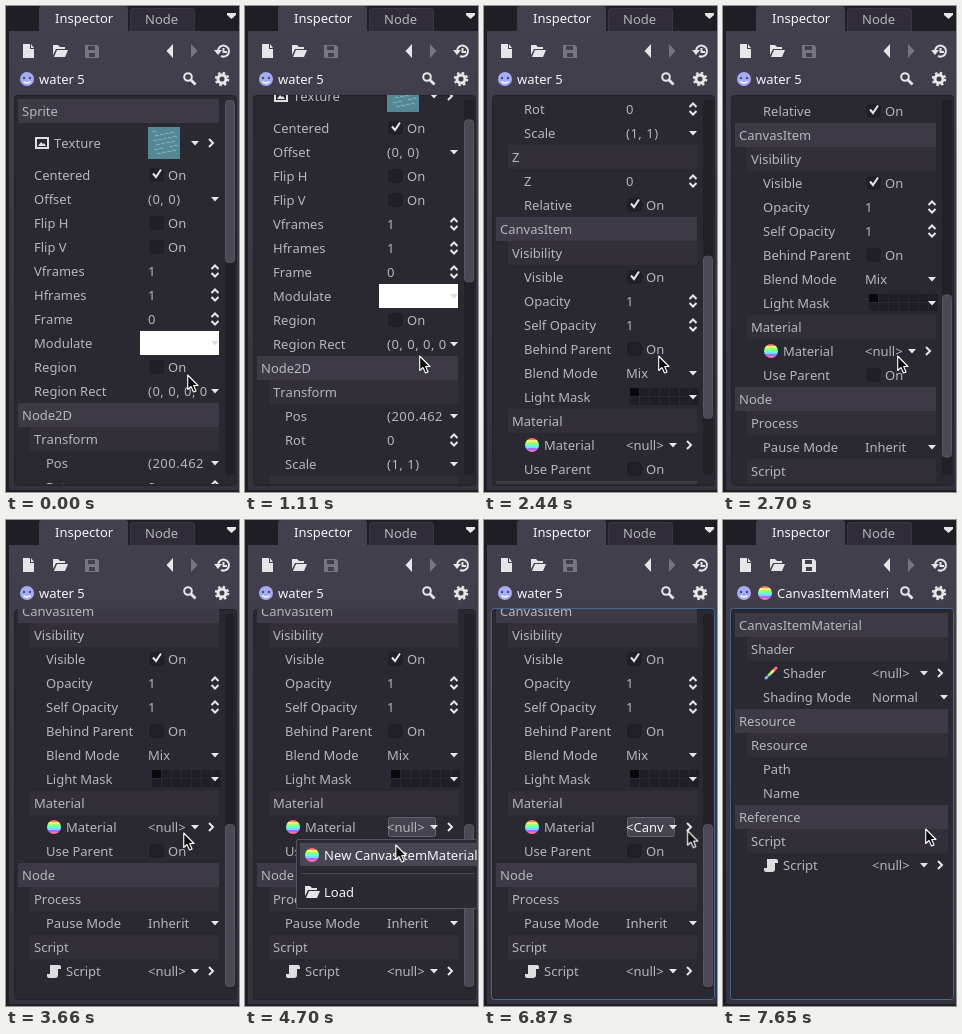
Recreate the animation shown at these times as an HTML page. Size 233 px wide and 486 px high, loop 8000 ms.

```html
<!DOCTYPE html>
<html lang="en">
<head>
<meta charset="utf-8">
<title>Inspector</title>
<style>
html, body { margin: 0; width: 100%; height: 100%; overflow: hidden; background: #201e25; }
svg { display: block; width: 233px; height: 486px; font: 13px "Noto Sans", sans-serif; font-kerning: none; fill: #b7b6ba; }
text { white-space: pre; }
.lit { fill: #e6e5e8; }
.lit text, text.lit { fill: #f6f5f8; }
.pale { fill: #dddce0; }
.num { letter-spacing: .5px; }
.line { fill: none; stroke: #e6e5e8; stroke-width: 2; }

#stage { animation: wheel 8s step-end infinite; }
#rows { transform: translateY(calc(var(--s) * -1px)); }
#thumb { transform: translateY(calc(var(--s) * .412px)); }
.step { animation: 8s step-end infinite; }
.before { animation-name: before; }
.after { animation-name: after; }
.focus { animation-name: focus; }
.frame { animation-name: frame; }
.empty { animation-name: empty; }
.set { animation-name: set; }
.menu { animation-name: menu; }
.hover { animation-name: hover; }
#cursor { animation: move 8s linear infinite; }

@keyframes wheel {
  0% { --s: 0 }
  13.875% { --s: 47 } 14.75% { --s: 94 } 15.5% { --s: 142 } 16.375% { --s: 189 }
  21.875% { --s: 236 } 23.25% { --s: 283 } 24.5% { --s: 331 }
  30.5% { --s: 378 } 31.875% { --s: 425 } 33.75% { --s: 472 }
  40.5%, 100% { --s: 510 }
}
@keyframes before { 0% { opacity: 1 } 94.125%, 100% { opacity: 0 } }
@keyframes after { 0% { opacity: 0 } 94.125%, 100% { opacity: 1 } }
@keyframes focus { 0% { opacity: 0 } 69.25%, 100% { opacity: 1 } }
@keyframes frame { 0% { opacity: 0 } 49.75%, 100% { opacity: 1 } }
@keyframes empty { 0% { opacity: 1 } 69.5%, 100% { opacity: 0 } }
@keyframes set { 0% { opacity: 0 } 69.5%, 100% { opacity: 1 } }
@keyframes menu { 0% { opacity: 0 } 50.75% { opacity: 1 } 69.25%, 100% { opacity: 0 } }
@keyframes hover { 0% { opacity: 0 } 57%, 100% { opacity: 1 } }
@keyframes move {
  0%, .24% { transform: translate(181px, 368px) }
  1%, 3.2% { transform: translate(178px, 365px) }
  5.25%, 43% { transform: translate(174px, 349px) }
  45.75% { transform: translate(177px, 312px) }
  47.875%, 54.6% { transform: translate(183px, 308px) }
  55.25% { transform: translate(181px, 306px) }
  58% { transform: translate(156px, 321px) }
  61.375%, 73.7% { transform: translate(130px, 334px) }
  76% { transform: translate(148px, 330px) }
  79% { transform: translate(207px, 314px) }
  81.75%, 85.8% { transform: translate(203px, 310px) }
  86.25%, 100% { transform: translate(202px, 308px) }
}
</style>
</head>
<body>
<svg id="stage" viewBox="0 0 233 486">
  <defs>
    <linearGradient id="dock" x2="0" y2="1">
      <stop stop-color="#42404d"/><stop offset="1" stop-color="#35323e"/>
    </linearGradient>
    <clipPath id="view"><path d="M9 89H230V478H9Z"/></clipPath>
    <clipPath id="disc"><circle r="7"/></clipPath>
    <path id="down" d="M-4-2H4L0 2.5Z"/>
    <path id="spin" class="line" d="M-3.5-2L0-5.500L3.500-2M-3.500 2L0 5.500L3.500 2"/>
    <path id="next" class="line" d="M-2-4L2 0L-2 4"/>
    <path id="folder" d="M-7-6H-2L0-4H5V-2H-4L-7 4ZM-3-1H8L5 6H-6Z"/>
    <path id="save" fill-rule="evenodd" d="M-7-6H5L7-4V7H-7ZM-4-5V-1H3V-5ZM-3 2V6H3V2Z"/>
    <g id="sprite">
      <circle r="7" fill="#a5acf4"/>
      <g fill="#4a4a78"><circle cx="-3" cy="-1" r="1.2"/><circle cx="3" cy="-1" r="1.2"/></g>
      <path fill="none" stroke="#fff" stroke-width="1.300" d="M-3.500 2.500Q0 5.500 3.500 2.500"/>
    </g>
    <g id="material" clip-path="url(#disc)"></g>
    <path id="script" fill="#dedde0" d="M-4-6H5A2 2 0 0 1 7-4V-2H4V4A3 3 0 0 1 1 7H-5A2 2 0 0 1-7 5V3H-4Z"/>
    <g id="shader" fill="none" stroke-width="3" stroke-linecap="round">
      <path stroke="#ff7088" d="M5-5L3-3"/><path stroke="#ffe070" d="M2-2L0 0"/>
      <path stroke="#7fe58c" d="M-1 1L-2 2"/><path stroke="#78b8ff" d="M-4 4L-5 5"/>
    </g>
    <g id="image" fill="#dedde0">
      <path fill-rule="evenodd" d="M-7-6H7V6H-7ZM-5-4V4H5V-4Z"/>
      <path d="M-4 3L-1-1L1 1L2 0L4 3Z"/>
    </g>
  </defs>

  <path fill="#201e25" d="M0 0H233V486H0Z"/>
  <path fill="#302d38" stroke="#3a3743" d="M124.500 25V5Q124.500 2.500 127 2.500H186Q188.500 2.500 188.500 5V25"/>
  <path fill="url(#dock)" d="M3 25H233V484H5Q3 484 3 482Z"/>
  <path fill="#42404d" d="M33 26V3Q33 0 36 0H119Q122 0 122 3V26Z"/>
  <text class="lit" x="49" y="17">Inspector</text>
  <text x="139" y="18">Node</text>
  <path class="lit" d="M221 7H230V9L225.500 13L221 9Z"/>

  <g class="lit">
    <path d="M17 38H24V43H28V52H17ZM25 38L28 42H25Z"/>
    <use href="#folder" x="54" y="45"/>
    <use href="#save" x="86" y="45" fill="#77757f" class="step before"/>
    <use href="#save" x="86" y="45" class="step after"/>
    <path d="M167 38V52L160.500 45Z"/>
    <path fill="#77757f" d="M185 38V52L191.500 45Z"/>
    <path class="line" d="M212 45A5.500 5.500 0 1 1 215 50M217.500 42V46H221"/>
    <path d="M208 44H216L212 49Z"/>
    <g class="line"><circle cx="182" cy="71" r="3.800"/><path d="M184.500 73.500L189.500 78.500" stroke-width="2.800"/></g>
    <g fill="none" stroke="#e6e5e8">
      <circle cx="216" cy="73" r="4" stroke-width="3"/>
      <circle cx="216" cy="73" r="6" stroke-width="2.500" stroke-dasharray="2.400 2.312"/>
    </g>
    <use href="#sprite" x="21" y="73"/>
    <text x="33" y="78" class="step before">water 5</text>
    <g class="step after"><use href="#material" x="42" y="73"/><text x="54" y="78">CanvasItemMateri</text></g>
  </g>

  <rect x="8.500" y="89.500" width="222" height="390" rx="3" fill="#2a2830" stroke="#242229"/>
  <g clip-path="url(#view)">
    <g class="step before">
      <g id="rows"></g>
      <rect x="219" y="94" width="10" height="375" rx="4" fill="#222027"/>
      <rect id="thumb" x="219.500" y="94.500" width="9" height="162" rx="3" fill="#4b4954" stroke="#575560"/>
    </g>
    <g class="step after" id="fresh"></g>
  </g>
  <rect class="step focus" x="7.500" y="88.500" width="223" height="391" rx="3" fill="none" stroke="#48668f"/>

  <g class="step menu">
    <rect x="51.500" y="319.500" width="181" height="69" rx="2" fill="#2b2932" stroke="#55535f"/>
    <path class="step hover" fill="#484653" d="M55 323H233V346H55Z"/>
    <use href="#material" x="67" y="335"/>
    <text class="lit" x="79" y="340">New CanvasItemMaterial</text>
    <path stroke="#4a4853" d="M56 353.500H229"/>
    <use class="lit" href="#folder" x="67" y="372"/>
    <text class="lit" x="79" y="377">Load</text>
  </g>

  <path id="cursor" fill="#0c0b0e" stroke="#fff" stroke-width="1.100" stroke-linejoin="round"
    d="M.7 1V15.500L4 12.500L6.500 18L9 17L6.700 11.500H11Z"/>
</svg>

<script>
const $ = id => document.getElementById(id);
const use = (id, x, cls = 'lit') => `<use href="#${id}" x="${x}" class="${cls}"/>`;
const text = (x, s, cls = '') => `<text x="${x}" y="5" class="${cls}">${s}</text>`;

$('material').innerHTML = ['#ff7070', '#ffeb70', '#9dff70', '#70ffb9', '#70deff', '#9f70ff', '#ff70ac']
  .map((c, i) => `<path fill="${c}" d="M-7 ${i * 2 - 7}h14v2h-14Z"/>`).join('');

// Value editors; x is the value column, r the right edge of the row.
const editors = {
  none: () => '',
  check: (x, r, on) => `<rect x="${x + 2}" y="-6" width="13" height="12" rx="2" fill="#222027" stroke="#1d1b21"/>` +
    (on ? `<path class="line" d="M${x + 5}-1.500L${x + 8} 2L${x + 13}-5.500"/>` : '') + text(x + 20, 'On'),
  num: (x, r, v) => text(x, v, 'num') + use('spin', r - 4),
  tuple: (x, r, v) => text(x, v, 'num') + use('down', r - 4),
  list: (x, r, v) => text(x, v) + use('down', r - 4),
  res: (x, r) => text(x, '&lt;null&gt;') + use('down', r - 24) + use('next', r - 8),
  pick: (x, r) =>
    `<rect class="step frame" x="${x + 1.5}" y="-9.500" width="47" height="19" rx="2" fill="#45434e" stroke="#65636e"/>` +
    `<g class="step empty">${text(x, '&lt;null&gt;')}</g>` +
    `<g class="step set">${text(x, '&lt;Canv', 'lit')}</g>` +
    use('down', r - 24) + use('next', r - 8),
  thumb: (x, r) => {
    let waves = '';
    for (let i = 0; i < 22; i++) {
      const a = x + 4 + i * 11 % 23, b = -11 + i * 7 % 23;
      waves += `M${a} ${b}q2-2 4 0`;
    }
    return `<path fill="#568795" d="M${x}-16h32v32h-32Z"/><path fill="none" stroke="#79bdc1" d="${waves}"/>` +
      use('down', r - 24) + use('next', r - 8);
  },
  color: (x, r) => `<path fill="#fff" d="M134-12H${r}V12H134Z"/>` + use('down', r - 4, 'pale'),
  mask: (x, r) => {
    let cells = '';
    for (let i = 0; i < 14; i++)
      cells += `<rect x="${x + 4 + i % 7 * 10}" y="${i < 7 ? -9 : 0}" width="9" height="8" fill="${i ? '#201e24' : '#09080b'}"/>`;
    return cells + use('down', r - 4);
  }
};

const title = s => ({ s, x: 16, bar: [12, '#3d3a46'] });
const part = s => ({ s, x: 28, bar: [24, '#322f39'] });
const prop = (s, kind = 'none', v, icon) => ({ s, kind, v, icon });

function build(rows, x, r) {
  let y = 105, indent = 28, out = '';
  for (const row of rows) {
    if (row.kind === 'thumb') y += 8;
    let body;
    if (row.bar) {
      indent = row.x + 12;
      body = `<path fill="${row.bar[1]}" d="M${row.bar[0]}-12H${r}V12H${row.bar[0]}Z"/>` + text(row.x, row.s);
    } else {
      body = (row.icon ? use(row.icon, indent + 8) : '') +
        text(indent + (row.icon ? 20 : 0), row.s) + editors[row.kind](x, r, row.v);
    }
    out += `<g transform="translate(0 ${y})">${body}</g>`;
    y += row.kind === 'thumb' ? 32 : 24;
  }
  return out;
}

$('rows').innerHTML = build([
  title('Sprite'),
  prop('Texture', 'thumb', 0, 'image'),
  prop('Centered', 'check', 1),
  prop('Offset', 'tuple', '(0, 0)'),
  prop('Flip H', 'check', 0),
  prop('Flip V', 'check', 0),
  prop('Vframes', 'num', 1),
  prop('Hframes', 'num', 1),
  prop('Frame', 'num', 0),
  prop('Modulate', 'color'),
  prop('Region', 'check', 0),
  prop('Region Rect', 'tuple', '(0, 0, 0, 0'),
  title('Node2D'),
  part('Transform'),
  prop('Pos', 'tuple', '(200.462'),
  prop('Rot', 'num', 0),
  prop('Scale', 'tuple', '(1, 1)'),
  part('Z'),
  prop('Z', 'num', 0),
  prop('Relative', 'check', 1),
  title('CanvasItem'),
  part('Visibility'),
  prop('Visible', 'check', 1),
  prop('Opacity', 'num', 1),
  prop('Self Opacity', 'num', 1),
  prop('Behind Parent', 'check', 0),
  prop('Blend Mode', 'list', 'Mix'),
  prop('Light Mask', 'mask'),
  part('Material'),
  prop('Material', 'pick', 0, 'material'),
  prop('Use Parent', 'check', 0),
  title('Node'),
  part('Process'),
  prop('Pause Mode', 'list', 'Inherit'),
  part('Script'),
  prop('Script', 'res', 0, 'script')
], 142, 213);

$('fresh').innerHTML = build([
  title('CanvasItemMaterial'),
  part('Shader'),
  prop('Shader', 'res', 0, 'shader'),
  prop('Shading Mode', 'list', 'Normal'),
  title('Resource'),
  part('Resource'),
  prop('Path'),
  prop('Name'),
  title('Reference'),
  part('Script'),
  prop('Script', 'res', 0, 'script')
], 149, 225);
</script>
</body>
</html>
```
